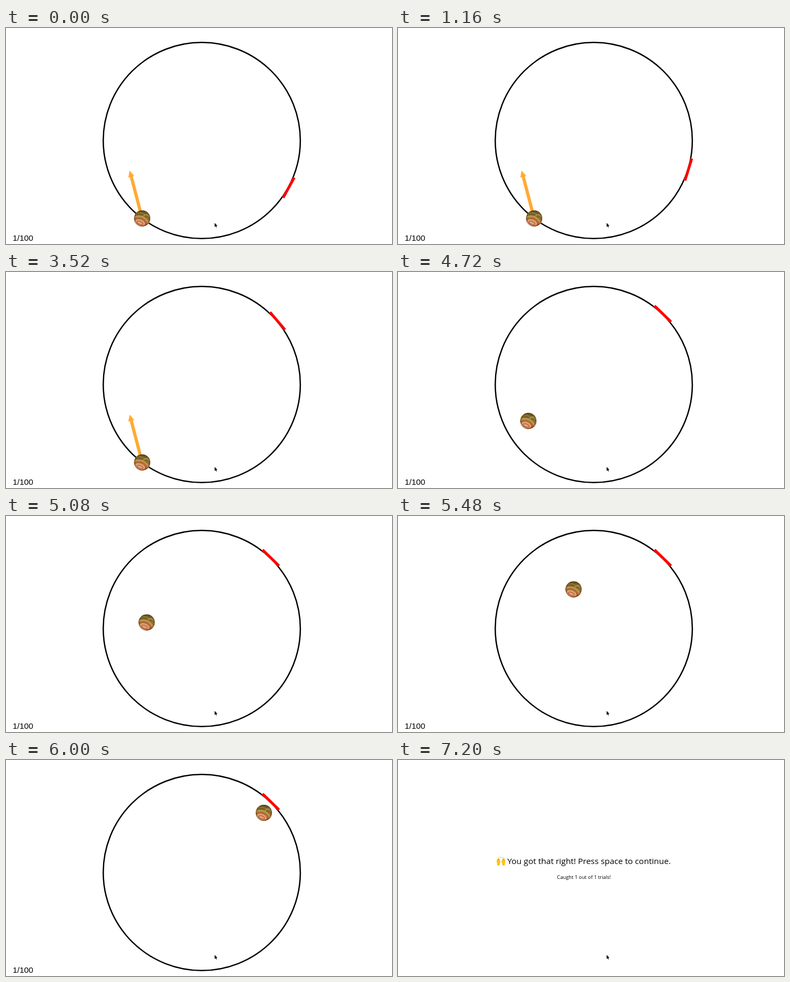
Write an HTML page that moves like this. It is 720x405 px and loops after 7720 ms.

```html
<!DOCTYPE html>
<html lang="en">
<head>
<meta charset="utf-8">
<title>Catch the ball</title>
<style>
  html, body { margin: 0; width: 100%; height: 100%; overflow: hidden; background: #fff; }
  svg { display: block; width: 720px; height: 405px; }
  .count { font: 15.3px "Liberation Sans", Arial, sans-serif; }
  .result { font: 15.35px "Open Sans", sans-serif; }
  .score { font: 9.25px "Open Sans", sans-serif; }
</style>
</head>
<body>
<svg viewBox="0 0 720 405">
  <defs>
    <clipPath id="disc"><circle r="15.3"/></clipPath>
    <linearGradient id="skin" x1="0" y1="0" x2="0" y2="1">
      <stop offset="0" stop-color="#66501d"/>
      <stop offset=".45" stop-color="#8a6a2c"/>
      <stop offset=".65" stop-color="#b9693a"/>
      <stop offset="1" stop-color="#9c4c22"/>
    </linearGradient>
    <radialGradient id="shade">
      <stop offset=".75" stop-color="#4a2c0c" stop-opacity="0"/>
      <stop offset="1" stop-color="#4a2c0c" stop-opacity=".5"/>
    </radialGradient>
    <g id="hand">
      <path d="M1.1 16.2V12.6C.2 11 .2 9 .5 7.2L.9 4.6q.7-.7 1.2 0L2.4 3q.7-.8 1.3 0l.2.3q.7-.6 1.2.2l.1 1q.8-.4 1.1.5L6.1 8.6q1.1-1 1.9-.2L6.2 12.4 5.6 16.2z" fill="#ffc21f"/>
      <path d="M2.2 4.6 1.9 8M3.8 4.2V8M5.1 4.9 5 8.2M1.1 15.7h4.5" fill="none" stroke="#e89a14" stroke-width=".5"/>
    </g>
  </defs>

  <g id="game">
    <circle cx="365.2" cy="210.9" r="183.8" fill="none" stroke="#000" stroke-width="2.5"/>
    <rect id="bar" x="182.2" y="-21.6" width="5" height="43.2" fill="#f00"/>
    <path id="arrow" transform="translate(254 357) rotate(-14.6)" fill="#ffaa32"
          d="M-3 0V-80.5H-5.8L0-92.5 5.8-80.5H3V0z"/>
    <g id="ball">
      <g clip-path="url(#disc)" fill="none">
        <circle r="15.3" fill="url(#skin)"/>
        <path d="M-13-8Q-5-13 1-9T13-9" stroke="#8f7b37" stroke-width="2"/>
        <path d="M2-4Q6-9 10-6T15-3" stroke="#a4964c" stroke-width="2"/>
        <path d="M-16-2Q-6-6 2-2T13 13" stroke="#b19a4c" stroke-width="3.4"/>
        <path d="M-16 1Q-6-3 1 1T9 15" stroke="#c1633a" stroke-width="2.2"/>
        <ellipse cx="-4" cy="8" rx="9" ry="5.2" transform="rotate(22 -4 8)" fill="#d79a6c" stroke="#e0ad80" stroke-width="1.4"/>
        <ellipse cx="-4" cy="8.5" rx="5.5" ry="2.6" transform="rotate(22 -4 8.5)" fill="#dfa67c" stroke="#c0603a" stroke-width="1.4"/>
        <path d="M-10 14Q0 17 9 11" stroke="#b4552a" stroke-width="2"/>
        <circle r="15.3" fill="url(#shade)"/>
      </g>
    </g>
    <text class="count" x="12.5" y="399">1/100</text>
  </g>

  <g id="end">
    <use href="#hand" x="183.8" y="181.3"/>
    <use href="#hand" transform="translate(200.4 181.3) scale(-1 1)"/>
    <path d="M187.4 183.2l-.5-.9M190.2 182.6l-.2-1M192.1 184v-1.2M194 182.6l.2-1M196.8 183.2l.5-.9" stroke="#47727d" stroke-width=".8"/>
    <text class="result" x="204" y="195">You got that right! Press space to continue.</text>
    <text class="score" x="296.6" y="223">Caught 1 out of 1 trials!</text>
  </g>

  <path d="M389.2 365.6v7.4l1.7-1.6 1.2 2.7 1.2-.5-1.2-2.6h2.3z" fill="#000" stroke="#fff" stroke-width=".5" paint-order="stroke"/>
</svg>
<script>
  const LOOP = 7720, TICK = 40;
  const AIM_END = 4320, LAUNCH = 4440, FINISH = 6040;
  const barMoves = [960, 1160, 1320, 1480, 1720, 2280, 2480, 2680, 2880, 3120, 3320, 3520, 3760];
  const [game, bar, arrow, ball, end] =
    ["game", "bar", "arrow", "ball", "end"].map(id => document.getElementById(id));
  const show = (el, on) => el.setAttribute("visibility", on ? "visible" : "hidden");

  // Position after n ticks of constant acceleration
  const travel = (from, speed, accel, n) => from + speed * n + accel * n * n / 2;

  function draw(ms) {
    const t = Math.floor(ms / TICK) * TICK;
    const steps = barMoves.filter(m => m <= t).length;
    const angle = (0.5 - 0.1 * steps) * 180 / Math.PI;
    bar.setAttribute("transform", `translate(365.2 210.9) rotate(${angle})`);

    const n = Math.max(0, t - LAUNCH) / TICK;
    const x = travel(254, -3.16, 0.4605, n), y = travel(357, -12.096, 0.2811, n);
    ball.setAttribute("transform", `translate(${x} ${y})`);

    show(game, t < FINISH);
    show(ball, t < FINISH);
    show(arrow, t < AIM_END);
    show(end, t >= FINISH);
  }

  const start = performance.now();
  function loop() {
    draw((performance.now() - start) % LOOP);
    requestAnimationFrame(loop);
  }
  loop();
</script>
</body>
</html>
```
